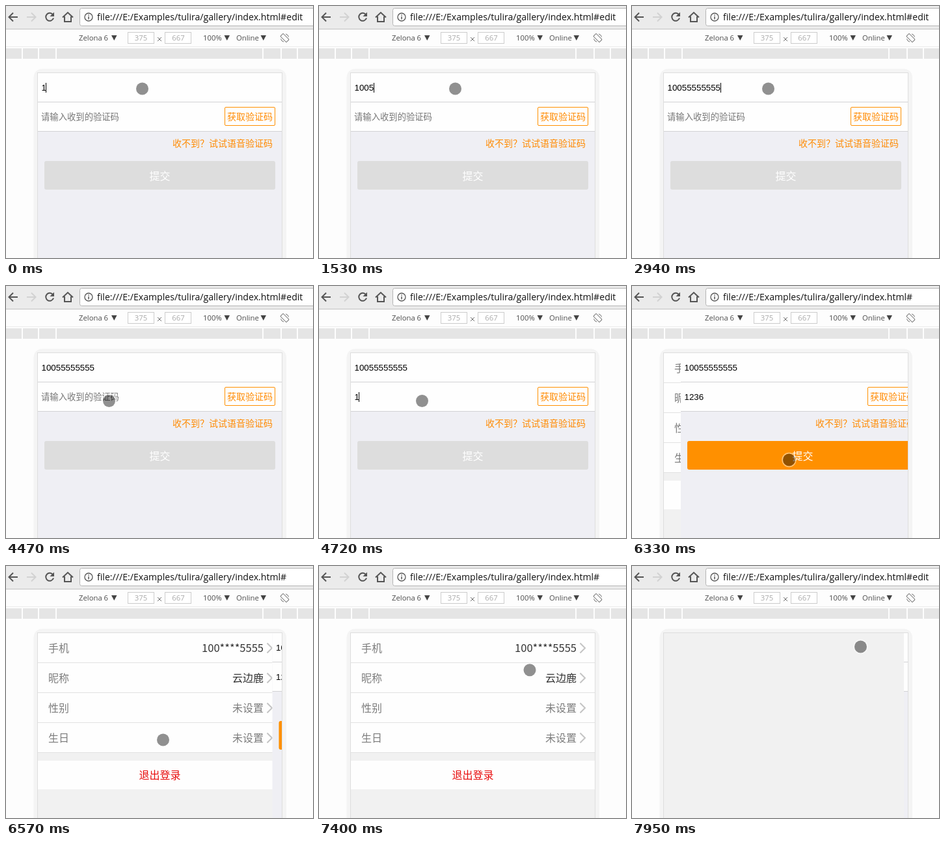
Recreate the animation shown at these times as an HTML page. Size 472 by 387 pixels, loop 8000 ms.

```html
<!DOCTYPE html>
<html lang="zh-CN">
<head>
<meta charset="utf-8">
<title>Form and profile</title>
<style>
  html, body { margin: 0; width: 100%; height: 100%; overflow: hidden; background: #fdfdfd; }
  svg { display: block; width: 472px; height: 387px; }
  text { font-family: "Noto Sans CJK SC", "Noto Sans CJK", sans-serif; white-space: pre; }
  .ui { font: 11.3px "Open Sans", "Noto Sans", sans-serif; fill: #4c4c4c; }
  .url { font: 14.12px "Open Sans", "Noto Sans", sans-serif; fill: #111; }
  .dim { fill: #aaa; }
  .typed { font: 13.333px "Liberation Sans", Arial, sans-serif; fill: #000; }
  .hint { font-size: 13.333px; fill: #757575; }
  .s14 { font-size: 14px; fill: #ff8a00; }
  .s16 { font-size: 16px; fill: #7c7c7c; }
  .s16.value { fill: #333; }
  .mask { font-size: 16.5px; fill: #333; }
  .wide { font-family: "Noto Sans CJK TC", "Noto Sans CJK", sans-serif; }
  .end { text-anchor: end; }
  .mid { text-anchor: middle; }
  .icon { fill: none; stroke: #555; stroke-width: 2; }
  .thin { fill: none; stroke: #6e6e6e; stroke-width: 1; }
  .box { fill: #fff; stroke: #ccc; }
  .sheet { fill: #fefefe; }
</style>
</head>
<body>
<svg viewBox="0 0 472 387">
  <defs>
    <clipPath id="screen"><rect x="49" y="103" width="375" height="284"/></clipPath>
  </defs>

  <!-- browser bar -->
  <rect width="472" height="36" fill="#ebebeb"/>
  <rect y="35" width="472" height="1" fill="#c2c2c2"/>
  <rect x="113.5" y="3.5" width="380" height="27" rx="3" fill="#fff" stroke="#b4b4b4"/>
  <path class="icon" d="M18 17H5M11 10.5L4.5 17L11 23.5"/>
  <path class="icon" style="stroke:#d2d2d2" d="M32 17H45M39 10.5L45.5 17L39 23.5"/>
  <path class="icon" d="M72.2 13.4A6 6 0 1 0 73 18.5"/>
  <path d="M74 9.5V16H67.5Z" fill="#555"/>
  <path class="icon" d="M87 17.5L95 10L103 17.5M90 16V24H100V16"/>
  <circle class="icon" style="stroke-width:1.3" cx="127" cy="17" r="6"/>
  <path d="M126.3 13.2h1.5v1.6h-1.5zM126.3 16h1.5v4.6h-1.5z" fill="#555"/>
  <text class="url" id="url" x="140" y="22"></text>

  <!-- device bar -->
  <rect y="36" width="472" height="27" fill="#fdfdfd"/>
  <rect y="62" width="472" height="1" fill="#ebebeb"/>
  <text class="ui" x="112" y="53">Zelona 6</text>
  <text class="ui" x="303" y="53">100%</text>
  <text class="ui" x="354" y="53">Online</text>
  <path d="M162 45h8.5l-4.25 8zM335.5 45h8.5l-4.25 8zM391.5 45h8.5l-4.25 8z" fill="#444"/>
  <rect class="box" x="187.5" y="40.5" width="40" height="17"/>
  <rect class="box" x="244.5" y="40.5" width="40" height="17"/>
  <text class="ui dim mid" x="207.5" y="53">375</text>
  <text class="ui dim mid" x="265" y="53">667</text>
  <path class="thin" d="M233 48l6 6M239 48l-6 6"/>
  <rect class="thin" x="425.5" y="42.5" width="6" height="13" rx="1" transform="rotate(-45 428.5 49)"/>
  <path class="thin" d="M430 43A6 6 0 0 1 434.5 47.5M427 55A6 6 0 0 1 422.5 50.5"/>
  <rect y="65" width="472" height="16" fill="#e5e5e5"/>
  <path d="M25 65v16M50 65v16M77 65v16M395 65v16M423 65v16M448 65v16" stroke="#fdfdfd" stroke-width="2"/>

  <!-- phone -->
  <rect x="42.5" y="96.5" width="388.5" height="320" rx="13" fill="#f4f4f4"/>
  <rect x="48.5" y="102.5" width="376" height="300" fill="#f1f1f1" stroke="#dedede"/>

  <g clip-path="url(#screen)">
    <g id="profile">
      <rect class="sheet" x="49" y="103" width="375" height="184"/>
      <rect class="sheet" x="49" y="299" width="375" height="44"/>
      <g id="rows"></g>
      <text class="s16 mid" style="fill:#e80c0c" x="236.5" y="327">退出登录</text>
    </g>

    <g id="edit">
      <rect x="49" y="103" width="375" height="284" fill="#efeff4"/>
      <rect class="sheet" x="49" y="103" width="375" height="89"/>
      <path d="M49 147.5h375M49 192.5h375" stroke="#d2d2d4"/>
      <text class="typed" id="phone" x="54.5" y="130"></text>
      <text class="typed" id="code" x="54.5" y="175"></text>
      <text class="hint" id="hint" x="54" y="175">请输入收到的验证码</text>
      <rect id="caret" y="118" width="1" height="15" fill="#000"/>
      <rect x="336.5" y="155.5" width="77" height="28" rx="1.5" fill="none" stroke="#ff9000"/>
      <text class="s14" x="340" y="175">获取验证码</text>
      <text class="s14 end" x="410" y="216">收不到<tspan class="wide">？</tspan>试试语音验证码</text>
      <rect id="submit" x="59" y="238" width="355" height="44" rx="3"/>
      <text class="s16 mid" style="fill:#fff" x="236.5" y="266.5">提交</text>
    </g>
  </g>

  <g id="touch">
    <circle r="10.3" fill="none" stroke="#fff" stroke-opacity=".45" stroke-width="1.8"/>
    <circle r="9.5" fill="#000" fill-opacity=".43"/>
  </g>
</svg>
<script>
const LOOP = 8000;
const PHONE = "10055555555", CODE = "1236";
const BASE = "file:///E:/Examples/tulira/gallery/index.html#";
const DIGIT = 7.415;
const $ = id => document.getElementById(id);

// [time, value] lists; each value holds until the next time
const phoneKeys = [0, 300, 420, 1380, 1580, 1780, 2090, 2225, 2360, 2660, 2940]
  .map((t, i) => [t, i + 1]);
const codeKeys = [[0, 0], [4720, 1], [4900, 2], [5080, 3], [5270, 4]];
const caretKeys = [[0, 1], [980, 0], [1380, 1], [3480, 0], [4040, 2],
  [4470, 0], [4720, 2], [6330, 0]];
const slideKeys = [[0, 0], [6330, 26], [6450, 277], [6570, 360.5], [6690, 375], [7950, 369]];
const touchKeys = [[0, [209.5, 127]],
  ...glide(3340, 3900, 5, [209.5, 127], [158.5, 176.5]),
  [5670, [189.5, 264]],
  ...glide(5790, 6210, 4, [189.5, 264], [241.5, 267]),
  ...glide(7250, 7680, 4, [241.5, 267], [351.5, 124])];

function glide(t0, t1, n, a, b) {
  return Array.from({ length: n }, (_, i) => {
    const p = (i + 1) / n, k = p * (2 - p);
    return [t0 + (t1 - t0) * i / (n - 1), a.map((v, j) => v + (b[j] - v) * k)];
  });
}

function at(keys, t) {
  let value = keys[0][1];
  for (const [time, v] of keys) if (time <= t) value = v;
  return value;
}

$("rows").innerHTML = [
  ["手机", "100****5555", "mask"],
  ["昵称", "云边鹿", "s16 value"],
  ["性别", "未设置", "s16"],
  ["生日", "未设置", "s16"]
].map(([label, value, style], i) => {
  const y = 126 + i * 46;
  return `<text class="s16" x="65" y="${y + 6}">${label}</text>
    <text class="${style} end" x="396" y="${y + 6}">${value}</text>
    <path d="M401.5 ${y - 7.5}l7.5 7.5l-7.5 7.5" fill="none" stroke="#c4c4c4" stroke-width="2"/>
    <path d="M49 ${y + 22.5}h375" stroke="#e2e2e2"/>`;
}).join("");

function draw(now) {
  const t = now % LOOP;
  const typed = at(phoneKeys, t), coded = at(codeKeys, t), field = at(caretKeys, t);
  const [x, y] = at(touchKeys, t);
  const listed = t >= 6330 && t < 7950;

  $("url").textContent = BASE + (listed ? "" : "edit");
  $("phone").textContent = PHONE.slice(0, typed);
  $("code").textContent = CODE.slice(0, coded);
  $("hint").style.display = coded ? "none" : "";
  $("submit").setAttribute("fill", coded === CODE.length ? "#ff9000" : "#dddddd");

  const caret = $("caret");
  caret.style.display = field ? "" : "none";
  caret.setAttribute("x", Math.floor(54.5 + DIGIT * (field === 2 ? coded : typed)));
  caret.setAttribute("y", field === 2 ? 163 : 118);

  $("edit").setAttribute("transform", `translate(${at(slideKeys, t)} 0)`);
  $("profile").style.display = listed ? "" : "none";
  $("touch").setAttribute("transform", `translate(${x} ${y})`);
}

const start = performance.now();
function tick() {
  draw(performance.now() - start);
  requestAnimationFrame(tick);
}
tick();
</script>
</body>
</html>
```
